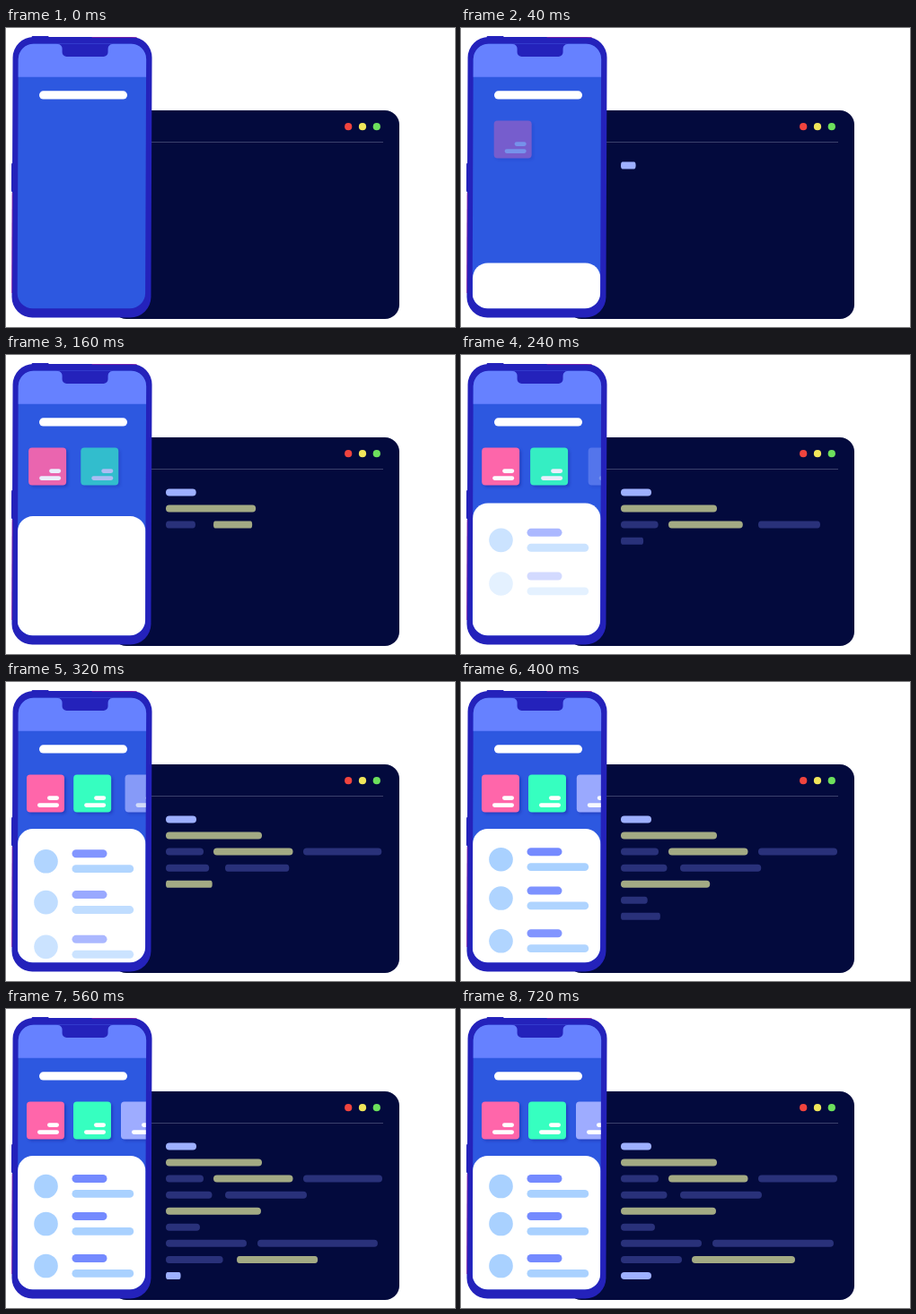
These frames come from a looping animation (500 by 334 pixels, 1200 ms). An HTML page with a canvas:

```html
<!DOCTYPE html>
<html lang="en">
<head>
<meta charset="utf-8">
<title>Phone and code window</title>
<style>
html, body { margin: 0; width: 100%; height: 100%; overflow: hidden; background: #fff; }
canvas { display: block; width: 500px; height: 334px; }
</style>
</head>
<body>
<canvas id="stage" width="500" height="334"></canvas>
<script>
const ctx = document.getElementById('stage').getContext('2d');
const LOOP = 1200, STEP = 20;
const NAVY = '#29317a', OLIVE = '#a3aa84', LAVENDER = '#9eb0ff';
const BLUE = [45, 88, 224];

// Code bars in typing order: line, left, right, colour
const CODE = [
  [0, 178, 212, LAVENDER],
  [1, 178, 285, OLIVE],
  [2, 178, 220, NAVY], [2, 231, 319.5, OLIVE], [2, 331, 419, NAVY],
  [3, 178, 229.5, NAVY], [3, 244, 335, NAVY],
  [4, 178, 284, OLIVE],
  [5, 178, 216, NAVY],
  [6, 178, 268, NAVY], [6, 280, 415, NAVY],
  [7, 178, 246, NAVY], [7, 257, 372, OLIVE],
  [8, 178, 212, LAVENDER]
];
// Cards: left, start, colour
const CARDS = [
  [23, 0, [255, 102, 170]],
  [75, 80, [54, 255, 192]],
  [128, 200, [158, 172, 255]]
];
// List rows: centre y, start, duration
const ROWS = [[198, 160, 300], [240, 200, 340], [287, 240, 300]];

// Cubic ease-out, 0 to 1
function ease(t, start, length) {
  const p = Math.min(1, Math.max(0, (t - start) / length));
  return 1 - (1 - p) ** 3;
}

function mix(color, amount) {
  return `rgb(${BLUE.map((c, i) => Math.round(c + (color[i] - c) * amount))})`;
}

function box(x, y, w, h, r, color) {
  ctx.fillStyle = color;
  ctx.beginPath();
  ctx.roundRect(x, y, w, h, r);
  ctx.fill();
}

function dot(x, y, r, color) {
  ctx.fillStyle = color;
  ctx.beginPath();
  ctx.arc(x, y, r, 0, Math.PI * 2);
  ctx.fill();
}

function drawWindow(t) {
  box(118, 92, 320, 233, 16, '#030a3d');
  ['#f0443e', '#f1e65a', '#6de05c'].forEach((c, i) => dot(381.2 + i * 15.8, 110.2, 4.1, c));
  ctx.fillStyle = '#3c416c';
  ctx.fillRect(150, 127, 270, 1);
  CODE.forEach(([line, left, right, color], i) => {
    const s = ease(t, i * 40, 200);
    if (s) box(left, 149.5 + line * 18.06, (right - left) * s, 8, { x: 4 * s, y: 4 }, color);
  });
}

function drawCard(t, [left, start, color]) {
  const a = ease(t, start, 300);
  if (!a) return;
  const x = left + 21 * (1 - a);
  ctx.save();
  ctx.shadowColor = `rgba(20, 30, 150, ${0.4 * a})`;
  ctx.shadowBlur = 3;
  ctx.shadowOffsetX = ctx.shadowOffsetY = 2;
  box(x, 103.5, 42, 42, 4, mix(color, a));
  ctx.restore();
  const white = mix([255, 255, 255], a);
  box(x + 23, 127.3, 13, 4.6, 2.3, white);
  box(x + 12, 135.3, 24, 4.6, 2.3, white);
}

function drawRow(t, [cy, start, length]) {
  const a = ease(t, start, length);
  if (!a) return;
  const y = cy + 22.5 * (1 - a);
  ctx.globalAlpha = a;
  dot(44.5, y, 13.3, '#a9d1ff');
  box(73.5, y - 13, 39, 9, 4.5, '#748aff');
  box(73.5, y + 4, 68.7, 8.8, 4.4, '#a9d1ff');
  ctx.globalAlpha = 1;
}

function drawNotch() {
  ctx.fillStyle = '#2422bb';
  ctx.beginPath();
  ctx.moveTo(56, 17);
  ctx.lineTo(56, 18);
  ctx.arcTo(62, 18, 62, 24, 5);
  ctx.arcTo(62, 32, 68, 32, 5);
  ctx.arcTo(113, 32, 113, 26, 5);
  ctx.arcTo(113, 18, 119, 18, 5);
  ctx.lineTo(119, 17);
  ctx.fill();
}

function drawPhone(t) {
  ctx.save();
  // The phone leans very slightly
  ctx.transform(1, 0, -0.004, 1, 0.67, 0);
  box(7, 10, 155, 313.5, 23, '#2422bb');
  box(28, 9, 19, 4, 1, '#2422bb');
  box(6, 151, 3, 32, 1, '#2422bb');
  ctx.fillStyle = '#8a20a8';
  ctx.fillRect(95, 10, 50, 0.7);
  ctx.fillRect(6.8, 184, 0.8, 112);

  ctx.beginPath();
  ctx.roundRect(13.2, 17.8, 142.4, 295.4, 17);
  ctx.clip();
  ctx.fillStyle = mix(BLUE, 1);
  ctx.fillRect(0, 0, 170, 330);
  ctx.fillStyle = '#6681ff';
  ctx.fillRect(0, 0, 170, 54.7);
  drawNotch();

  ctx.setTransform(1, 0, 0, 1, 0, 0);
  box(37, 70.3, 98, 9.2, 4.6, '#fff');
  CARDS.forEach(card => drawCard(t, card));
  const rise = ease(t, 0, 305);
  if (rise) box(13, 314 - 150 * rise, 142.4, 180, 17, '#fff');
  ROWS.forEach(row => drawRow(t, row));
  ctx.restore();
}

function frame() {
  const t = Math.floor((performance.now() % LOOP) / STEP) * STEP;
  ctx.fillStyle = '#fff';
  ctx.fillRect(0, 0, 500, 334);
  drawWindow(t);
  drawPhone(t);
  requestAnimationFrame(frame);
}
frame();
</script>
</body>
</html>
```
